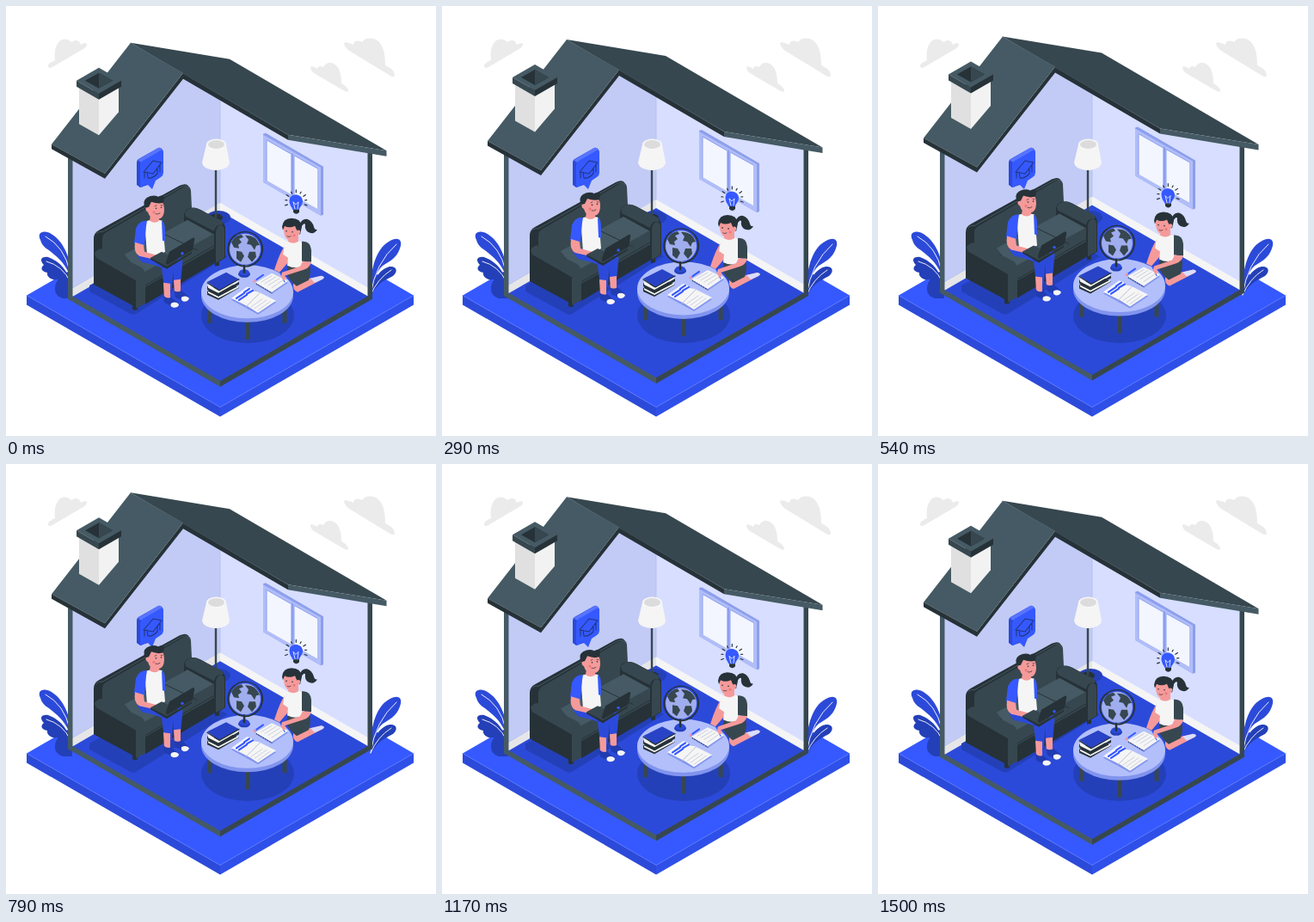
These frames come from a looping animation (500 by 500 pixels, 1540 ms). An HTML page:

```html
<!DOCTYPE html>
<html lang="en">
<head>
<meta charset="utf-8">
<title>Studying at home</title>
<style>
html, body { margin: 0; width: 100%; height: 100%; overflow: hidden; background: #fff; }
svg { display: block; width: 100%; height: 100%; }
.ln { fill: none; stroke-linecap: round; stroke-linejoin: round; }
.a { fill: #3559ff; } .b { fill: #2c4ad9; } .sh { fill: #2440b8; }
.d { fill: #263238; } .m { fill: #37474f; } .l { fill: #455a64; }
.w { fill: #f5f5f5; } .skin { fill: #f59a9a; }
</style>
</head>
<body>
<svg viewBox="0 0 500 500">
  <g fill="#ebebeb">
    <path d="M49 69Q50 66 57 63Q55 47 63 40Q70 36 76 42Q84 37 87 45Q94 41 94 45Q94 48 88 51L54 71Q49 74 49 69Z"/>
    <path d="M354 71Q355 69 362 73Q363 68 369 71Q373 64 381 67Q390 72 390 90Q398 94 398 99Q397 101 392 98L358 78Q354 75 354 71Z"/>
    <path d="M393 43Q395 41 404 45Q405 38 414 42Q419 35 430 39Q441 45 441 69Q452 74 452 81Q451 84 445 80L399 52Q393 47 393 43Z"/>
  </g>

  <g transform="translate(0 -.6)">
    <path class="a" d="M249 207L474 337L249 467L24 337Z"/>
    <path class="b" d="M24 337L249 467V478L24 348Z"/>
    <path fill="#2f50e8" d="M474 337L249 467V478L474 348Z"/>
    <path class="ln" d="M24 337L249 467L474 337" stroke="#5b78ff" stroke-width=".7"/>
  </g>

  <g>
    <path class="sh" d="M77 340H66Q56 337 57 327Q58 315 77 308Z"/>
    <path class="b" d="M76 318C76 292 66 272 51 264C42 260 36 264 40 272C42 281 50 283 56 289C66 297 72 306 76 318Z"/>
    <path class="sh" d="M77 328C73 308 63 297 49 292C40 291 39 296 44 301C39 305 42 309 48 310C47 315 53 319 59 318C66 318 72 322 77 328Z"/>
    <path class="ln" d="M46 268Q68 280 74 308M47 297Q66 302 75 321" stroke="#fff" stroke-width=".9"/>
    <path class="b" d="M424 335C423 305 431 282 445 274C456 267 462 272 458 282C454 294 445 297 438 302C430 309 428 320 424 335Z"/>
    <path class="sh" d="M424 338C425 320 434 306 446 303C454 302 456 308 451 313C445 318 433 319 424 338Z"/>
    <path class="ln" d="M424 336Q429 299 454 277M424 336Q432 317 448 307" stroke="#fff" stroke-width=".9"/>
  </g>

  <g class="float">
    <path class="b" d="M249 237L424 338L249 438L74 338Z"/>
    <path fill="#c2cbf5" d="M76 174L114 196L206 80L249 104V229L76 328Z"/>
    <path fill="#d7deff" d="M249 104L328 152L423 168V329L249 229Z"/>
    <path fill="#e6e6e8" d="M76 328L249 228V238L76 338Z"/>
    <path class="w" d="M249 228L423 328V338L249 238Z"/>
    <path class="ln" d="M249 104V228" stroke="#aebaf0" stroke-width=".7"/>
    <path fill="#8c9eec" d="M299 148L302 147L369 186V242L366 243L299 204Z"/>
    <path fill="#b0bdf8" d="M299 149L366 187V243L299 204Z"/>
    <path fill="#f3f6ff" d="M303 155L331 171V218L303 202ZM335 173L362 188V235L335 220Z"/>
    <path class="ln" d="M303 202V155L331 171M335 220V173L362 188" stroke="#8c9eec"/>
    <path class="ln" d="M333 171V221" stroke="#8395ea" stroke-width="1.5"/>
  </g>

  <g>
    <path class="sh" d="M97 325L205 265L258 291L151 358Q147 360 143 357L97 332Z"/>
    <ellipse class="sh" cx="281" cy="360" rx="54" ry="32"/>
    <ellipse class="sh" cx="247" cy="246" rx="14" ry="8"/>
    <ellipse class="d" cx="244" cy="246" rx="8" ry="4.500"/>
    <path class="ln" d="M244 188V245" stroke="#37474f" stroke-width="2.4"/>
    <path fill="#f5f5f5" d="M233 161L228 182Q229 190 244 191Q259 190 260 182L256 161Z"/>
    <ellipse fill="#f7f7f7" cx="244.500" cy="161" rx="11.500" ry="6.500"/>
    <ellipse fill="#dcdcdc" cx="244.500" cy="161" rx="9.500" ry="5"/>
    <path class="b" d="M152 182Q152 179 154 178L177 165Q179 164 182 167L183 171L165 208L156 211L152 208Z"/>
    <path fill="#5874ff" d="M153 179L177 165Q180 164 182 167L157 182Z"/>
    <path class="a" d="M156 185Q156 182 159 180L180 168Q183 167 183 170V194Q183 197 180 199L174 203L170 213L164 207L159 210Q156 212 156 208Z"/>
    <path class="ln" d="M160 193L171 180L181 182L171 195ZM164 193L165 200Q170 201 176 195V189M179 184L179 193M161 194L161 200" stroke="#21357f" stroke-width="1.100"/>
  </g>

  <g class="float">
    <g id="sofa">
      <path class="d" d="M147 347H153V352Q150 354 147 352ZM243 297H248V301L243 302Z"/>
      <path class="d" d="M102 270Q102 263 108 260L202 208Q213 203 214 214L216 250L160 300L102 300Z"/>
      <path class="m" d="M112 270Q112 264 119 261L203 212Q214 205 215 214L217 255L134 300L112 284Z"/>
      <path class="ln" d="M105 264Q107 261 112 262L203 210Q210 206 213 211" stroke="#455a64"/>
      <path class="d" d="M207 243Q207 235 215 234Q220 233 226 236L250 249Q255 252 255 259V292L244 299L207 280Z"/>
      <path class="m" d="M208 239Q212 233 220 234L249 248Q254 251 252 254Q244 252 242 261L209 244Z"/>
      <path class="m" d="M244 262Q245 255 249 254Q254 254 254 260V292L244 298Z"/>
      <path class="l" d="M138 288L211 248L242 265V276L162 321Z"/>
      <path class="m" d="M160 309L242 264V282L162 330Z"/>
      <path class="d" d="M162 326L243 280V298L162 346Z"/>
      <path class="ln" d="M183 264L222 283M162 324L242 278" stroke="#263238"/>
      <path class="d" d="M102 291Q103 283 110 283L152 306V350L102 323Z"/>
      <path class="m" d="M103 287Q107 280 115 282L157 303Q162 306 161 311Q154 308 152 319L105 292Z"/>
      <path class="m" d="M151 320Q152 309 158 309Q162 310 162 316V345L151 351Z"/>
    </g>

    <g id="boy">
      <path class="b" d="M152 289Q157 282 168 287L201 290Q207 293 205 301L203 322L195 324L194 306Q194 329 192 330L184 328L181 304Q179 302 158 297Z"/>
      <path class="ln" d="M181 303Q190 302 193 296" stroke="#213bb0"/>
      <path class="skin" d="M183 321L191 322V340L184 339ZM195 318L203 317V334L196 334Z"/>
      <path fill="#213bb0" d="M183 336Q187 340 192 338L200 345Q202 349 196 350L184 344ZM195 330Q200 333 204 330L212 337Q214 341 208 343L197 338Z"/>
      <path class="w" d="M192 345Q197 342 201 346Q201 350 195 350Q190 349 192 345ZM204 338Q209 335 213 339Q212 343 207 343Q203 342 204 338Z"/>
      <path class="w" d="M161 250Q172 246 182 249L185 285Q172 293 164 288Z"/>
      <path class="a" d="M164 249Q155 248 151 258L149 275L161 278L163 255Z"/>
      <path class="a" d="M181 249Q185 250 185 261V273L182 272Z"/>
      <path class="skin" d="M150 274L160 277L161 285L179 290Q182 294 177 295L155 290Q148 286 150 274Z"/>
      <path class="skin" d="M168 242H178V249Q173 253 167 249Z"/>
      <path class="skin" d="M163 230Q166 223 175 224Q184 225 184 235Q184 247 176 247Q167 247 165 239Q161 237 163 230Z"/>
      <path class="d" d="M162 234Q158 226 164 222Q171 218 177 221Q183 218 184 222L183 228Q177 230 169 227L166 233Z"/>
      <g class="d"><circle cx="174.500" cy="234.500" r=".8"/><circle cx="180.500" cy="233.500" r=".8"/></g>
      <path class="ln" d="M174 241Q177 242 179 240M173 232L175 231M180 231L182 231" stroke="#263238" stroke-width=".7"/>
      <circle cx="172" cy="239" r="1.500" fill="#ee7777"/>
      <path class="m" d="M168 292L181 285L202 295L187 304Z"/>
      <path class="d" d="M190 285L217 269Q220 268 219 272L217 283L188 300Q185 300 186 297Z"/>
      <path class="d" d="M168 292L187 302L216 285V287L187 305L168 294Z"/>
      <circle class="a" cx="205" cy="287" r="1.700"/>
    </g>

    <g id="girl">
      <path class="skin" d="M334 322L349 317L366 313Q372 314 368 317L339 332Q333 330 334 322Z"/>
      <path fill="#d9deff" d="M354 316L367 313Q372 314 368 317L359 321Z"/>
      <path class="m" d="M328 300L352 299Q356 304 352 318L338 325Q330 319 326 310Z"/>
      <path class="skin" d="M325 277Q319 284 312 306L318 309L330 295Z"/>
      <path class="w" d="M324 276Q336 269 347 275L347 301Q337 306 327 301L328 292L322 288Z"/>
      <path class="m" d="M344 273Q354 272 355 283L355 297L344 296Z"/>
      <path class="skin" d="M345 296L355 297Q353 304 346 306L324 313Q319 314 321 309L342 302Z"/>
      <path class="skin" d="M329 267H340V273Q334 277 328 273Z"/>
      <path class="d" d="M341 254Q344 246 350 247Q356 249 358 256Q359 260 362 259Q358 266 351 262Q347 259 348 253Q346 251 343 257Z"/>
      <path class="skin" d="M323 254Q325 247 334 248Q343 250 342 260Q340 272 331 272Q322 271 323 254Z"/>
      <path class="d" d="M321 256Q322 246 332 246Q343 246 344 256L342 265L339 262L336 255Q329 258 324 255L322 260Z"/>
      <circle class="skin" cx="340" cy="262" r="2.300"/>
      <g class="d"><circle cx="326" cy="261" r=".8"/><circle cx="333" cy="262" r=".8"/></g>
      <path class="ln" d="M327 267Q329 268.500 331 267" stroke="#263238" stroke-width=".7"/>
      <circle cx="335" cy="266" r="1.500" fill="#ee7777"/>
    </g>

    <g id="bulb">
      <path class="a" d="M333 236Q333 234 331 232Q328 225 331 221Q337 216 343 221Q347 226 343 232Q341 234 341 236Z"/>
      <path class="d" d="M334 236H341V239Q337.500 243 334 239Z"/>
      <path class="ln" d="M336 235L334 227L337 230L340 227L339 235" stroke="#fff" stroke-width=".8"/>
      <path id="rays" class="ln" stroke="#263238" stroke-width="1.200"/>
    </g>

    <g id="table">
      <path d="M237 352V368M281 362V387M324 352V368" stroke="#37474f" stroke-width="5"/>
      <path fill="#8194ee" d="M227 332V336A53.500 31 0 0 0 334 336V332Z"/>
      <ellipse fill="#b2bffb" cx="280.500" cy="331.500" rx="53.500" ry="31"/>
      <path class="d" d="M234 331L255 319L271 327L247 341L234 335Z"/>
      <path class="w" d="M235 331L247 337L270 325V327L247 339L235 333Z"/>
      <path class="d" d="M234 325L247 334L271 320V323L247 337L234 329Z"/>
      <path class="w" d="M235 323L247 330L270 317V320L247 333L235 327Z"/>
      <path fill="#2843c6" d="M234 320L256 309L271 317L248 330Z"/>
      <path class="ln" d="M234 321L248 330L271 317" stroke="#263238" stroke-width="1.200"/>
      <path fill="#8194ee" d="M262 341L281 328L314 344L293 358Z"/>
      <path class="w" d="M262 339L280 326Q285 326 288 331L294 332L314 342L293 356L282 349Z"/>
      <path class="ln" d="M279 349L295 333" stroke="#b8bfd8"/>
      <path class="ln" d="M268 339L277 333M271 341L280 335M277 332L283 328M280 334L287 330" stroke="#3559ff" stroke-width="2.200"/>
      <path class="ln" d="M285 349L298 340M289 351L303 341M293 353L307 343" stroke="#c3c7d5" stroke-width=".8"/>
      <g transform="translate(0 1)">
        <path fill="#8194ee" d="M290 322L309 311L328 320L309 333Z"/>
        <path class="w" d="M290 320L309 309L328 318L309 331Z"/>
        <path class="ln" d="M297 319L309 312M301 321L314 313M305 323L318 315M309 326L322 317" stroke="#c3c7d5" stroke-width=".8"/>
        <path class="ln" d="M291 321L309 332" stroke="#263238" stroke-dasharray="1 2"/>
        <path class="ln" d="M289 318L299 311" stroke="#3559ff" stroke-width="2"/>
        <path class="ln" d="M288 319L290 317" stroke="#f59a9a" stroke-width="2"/>
        <path class="ln" d="M319 309L324 319" stroke="#3559ff" stroke-width="1.200"/>
        <path class="skin" d="M319 312Q323 309 326 314L323 318Z"/>
      </g>
      <ellipse class="sh" cx="277" cy="311" rx="7" ry="4"/>
      <ellipse class="b" cx="277" cy="309" rx="6" ry="3.500"/>
      <path class="ln" d="M277 301V309" stroke="#263238" stroke-width="2.500"/>
      <circle fill="#a0adee" cx="278" cy="282" r="18"/>
      <path class="m" d="M262 274Q266 266 274 265L276 268L271 270L274 274L270 277L271 281L265 280ZM268 284L274 285L277 290L273 297L268 293ZM278 266Q290 265 295 277L291 278L289 283L285 277L280 276L282 271ZM283 285L290 285L291 291L286 297L281 291Z"/>
      <path class="ln" d="M266 266A20 20 0 1 0 295 271" stroke="#263238" stroke-width="1.800"/>
      <path class="ln" d="M266 266A20 20 0 0 1 295 271" stroke="#263238" stroke-width="1.200"/>
    </g>

    <g id="shell">
      <path class="l" d="M72 174L77.500 178V337L72 340Z"/>
      <path class="m" d="M420.500 167H426V340L420.500 337Z"/>
      <path class="l" d="M72 333.500L249 435.200V442L72 340Z"/>
      <path class="m" d="M426 333.500L249 435.200V442L426 340Z"/>
      <path class="m" d="M145 42L260 61L442.500 167.500L328 149L206 78Z"/>
      <path class="d" d="M206 77L328 149V155L206 84L115 200V194Z"/>
      <path class="l" d="M328 149L442.500 167.500V174L328 155Z"/>
      <path class="l" d="M145 42L206 77L115 194L53 160Z"/>
      <path class="d" d="M53 160L115 194V200L53 165.500Z"/>
      <path class="ln" d="M145 42.500L206 77.500L328 149" stroke="#52676f" stroke-width=".6"/>
      <path fill="#e0e0e0" d="M85 94L108 107V149.500L85 136.500Z"/>
      <path fill="#f2f2f2" d="M108 107L131 94V122.500L108 149.500Z"/>
      <path class="l" d="M82 86L108 71L134 86L108 101Z"/>
      <path class="m" d="M82 86L108 101V108L82 93Z"/>
      <path class="d" d="M134 86L108 101V108L134 93Z"/>
      <path class="d" d="M92 86L108 77L124 86L108 95Z"/>
      <path class="m" d="M108 77L124 86L108 95Z"/>
    </g>
  </g>
</svg>
<script>
const LOOP = 1540, CYCLE = 1500, FPS = 24, LIFT = 10, REST = 0.8;

// Fan of rays around the bulb, open at the bottom.
const RAYS = 9;
let d = '';
for (let i = 0; i < RAYS; i++) {
  const a = (160 + i * 220 / (RAYS - 1)) * Math.PI / 180;
  const at = r => `${(337.3 + r * Math.cos(a)).toFixed(1)} ${(226.5 + r * Math.sin(a)).toFixed(1)}`;
  d += `M${at(10.5)}L${at(i % 2 ? 12.5 : 13.5)}`;
}
document.getElementById('rays').setAttribute('d', d);

const floaters = document.querySelectorAll('.float');
const start = performance.now();

// Linear rise and fall, stepped at the frame rate.
function lift(ms) {
  const step = Math.floor((ms + 2) * FPS / 1000);
  const p = Math.min(1, step * 1000 / FPS / CYCLE);
  return LIFT * (1 - Math.abs(1 - 2 * p));
}

function draw(now) {
  const y = REST - lift(Math.max(0, now - start) % LOOP);
  for (const el of floaters) el.setAttribute('transform', `translate(0 ${y.toFixed(3)})`);
  requestAnimationFrame(draw);
}
draw(start);
</script>
</body>
</html>
```
